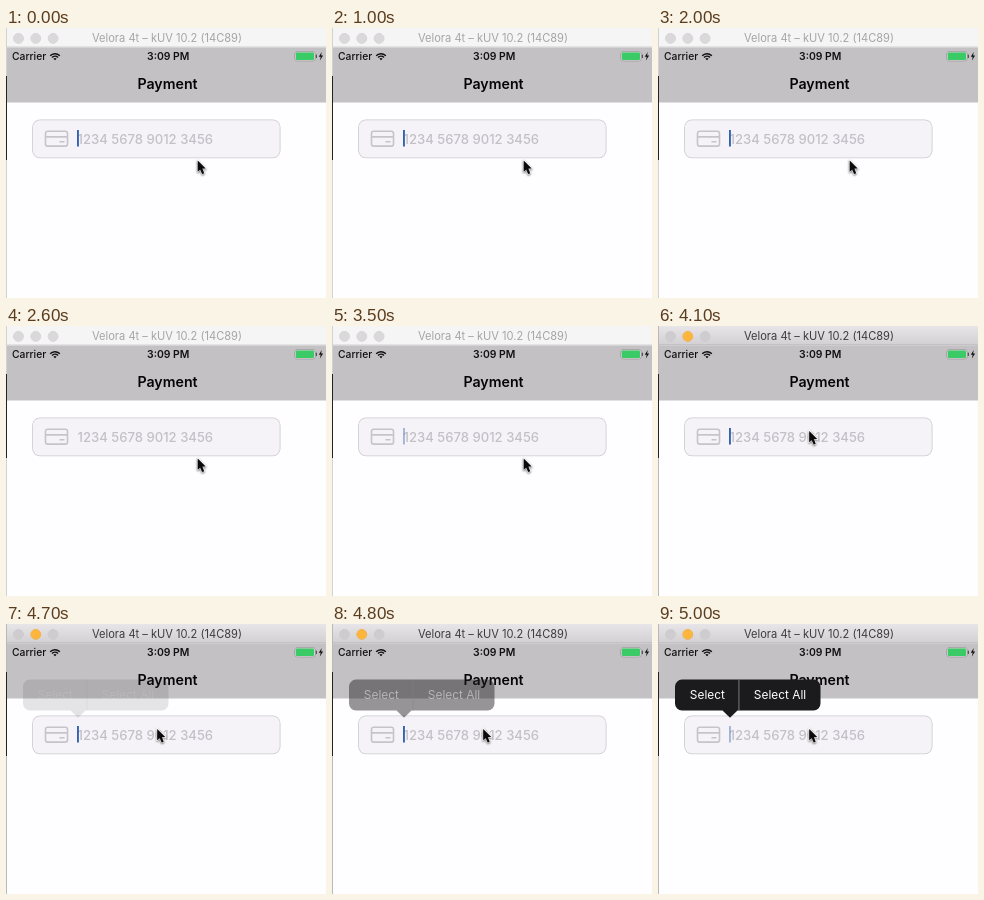
Write an HTML page with a canvas that moves like this. It is 320 px wide and 270 px high and loops after 5100 ms.

```html
<!DOCTYPE html>
<html lang="en">
<head>
<meta charset="utf-8">
<title>Payment field</title>
<style>
html, body { margin: 0; width: 100%; height: 100%; overflow: hidden; background: #fff; }
canvas { display: block; width: 320px; height: 270px; }
</style>
</head>
<body>
<canvas id="stage"></canvas>
<script>
const W = 320, H = 270, LOOP = 5100, STEP = 100;
const CLICK = 4000; // the window gains focus
const FONT = 'Inter, "Liberation Sans", sans-serif';
const INK = '#111', LINE = '#c6c3c9';
const canvas = document.getElementById('stage');
const ratio = window.devicePixelRatio || 1;
canvas.width = W * ratio;
canvas.height = H * ratio;
const ctx = canvas.getContext('2d');

function ease(t, from, to) {
  const p = Math.min(1, Math.max(0, (t - from) / (to - from)));
  return p * p * (3 - 2 * p);
}

// One blink per second; the click holds the caret lit for a while.
function caretAlpha(t) {
  const phase = t < CLICK ? t % 1000 : Math.max(0, t - CLICK - 500);
  return 1 - ease(phase, 380, 600) + ease(phase, 850, 1000);
}

function rect(x, y, w, h, fill) {
  ctx.fillStyle = fill;
  ctx.fillRect(x, y, w, h);
}

function paint(fill, stroke, line = 1) {
  if (stroke) {
    ctx.strokeStyle = stroke;
    ctx.lineWidth = line;
    ctx.stroke();
  }
  if (fill) {
    ctx.fillStyle = fill;
    ctx.fill();
  }
}

function round(x, y, w, h, r, fill, stroke, line) {
  ctx.beginPath();
  ctx.roundRect(x, y, w, h, r);
  paint(fill, stroke, line);
}

function poly(points, fill, stroke, line) {
  ctx.beginPath();
  points.forEach(([x, y]) => ctx.lineTo(x, y));
  ctx.closePath();
  paint(fill, stroke, line);
}

function text(str, x, y, size, color, align = 'left', weight = 400) {
  ctx.font = `${weight} ${size}px ${FONT}`;
  ctx.textAlign = align;
  ctx.fillStyle = color;
  ctx.fillText(str, x, y);
}

function titleBar(active, hover) {
  const shade = ctx.createLinearGradient(0, 0, 0, 19);
  shade.addColorStop(0, active ? '#e8e5e9' : '#f6f5f6');
  shade.addColorStop(1, active ? '#d3d0d4' : '#f6f5f6');
  rect(1, 0, W, 19, shade);
  rect(1, 18.5, W, 1, active ? '#b5b3b5' : '#d2d1d2');
  for (let i = 0; i < 3; i++) {
    const lit = hover && i === 1;
    ctx.beginPath();
    ctx.arc(12.5 + i * 17.3, 10.4, 4.9, 0, Math.PI * 2);
    paint(lit ? '#fdb53b' : active ? '#cfccd0' : '#dad8da', lit ? '#e5a33a' : '#c9c7ca', .8);
  }
  text('Velora 4t – kUV 10.2 (14C89)', 161, 14.3, 11.1, active ? '#3c3c3c' : '#a6a5a6', 'center');
}

function wifi(x, y) {
  const from = -Math.PI * .76, to = -Math.PI * .24;
  for (const r of [4.1, 6.6]) {
    ctx.beginPath();
    ctx.arc(x, y, r, from, to);
    paint(null, INK, 1.5);
  }
  ctx.beginPath();
  ctx.moveTo(x, y);
  ctx.arc(x, y, 2.2, from, to);
  paint(INK);
}

function battery(x, y) {
  round(x, y, 20, 9, 2, '#d0ced0', '#777', .7);
  round(x + .8, y + .8, 18.2, 7.4, 1.2, '#3acb66');
  round(x + 20.8, y + 2.8, 1.2, 3.4, .6, '#555');
  poly([[315.7, 24], [312.8, 28.8], [314.7, 28.8], [313.9, 32.6], [317.1, 27.4], [315.1, 27.4]], INK);
}

function header() {
  rect(1, 19.5, W, 55, '#c3c1c3');
  text('Carrier', 6, 32.1, 10.3, INK, 'left', 500);
  wifi(49, 32.3);
  text('3:09 PM', 162.2, 32.2, 10.4, INK, 'center', 600);
  battery(289, 23.8);
  text('Payment', 161.5, 61, 14.2, '#050505', 'center', 600);
}

function field(caret) {
  round(27, 92.3, 246.7, 37.2, 7, '#f5f3f7', '#ccc9cf', 1.6);
  round(39.5, 103.3, 22, 14.8, 2.2, null, LINE, 1.6);
  rect(40, 108, 21, 1.7, LINE);
  rect(53.5, 113, 5, 1.5, LINE);
  text('1234 5678 9012 3456', 71.5, 115.5, 13.1, '#c3c0c7', 'left', 500);
  ctx.globalAlpha = caret;
  rect(71, 102, 1.9, 16.5, '#3363b0');
  ctx.globalAlpha = 1;
}

function menu(alpha) {
  const left = 17, top = 55.6, width = 145.5, height = 30.9, tip = 72;
  const base = top + height;
  ctx.globalAlpha = alpha;
  ctx.beginPath();
  ctx.roundRect(left, top, width, height, 7);
  ctx.moveTo(tip - 7.5, base);
  ctx.lineTo(tip, base + 7.3);
  ctx.lineTo(tip + 7.5, base);
  paint('#1b1a1d');
  rect(80.5, top, .9, height, '#858388');
  text('Select', 49.4, 75.3, 11.9, '#fff', 'center');
  text('Select All', 122, 75.3, 11.9, '#fff', 'center');
  ctx.globalAlpha = 1;
}

function pointer(x, y) {
  ctx.save();
  ctx.translate(x, y);
  ctx.lineJoin = 'round';
  ctx.shadowColor = 'rgba(0, 0, 0, .4)';
  ctx.shadowBlur = 2 * ratio;
  ctx.shadowOffsetY = .8 * ratio;
  poly([[0, 0], [0, 11.3], [2.5, 9], [4.5, 13.6], [6.5, 12.8], [4.6, 8.2], [8, 8.2]],
    '#0a0a0a', '#fff', 1.8);
  ctx.restore();
}

function leftEdge(active) {
  rect(0, 0, 1, H, active ? '#b9b9b9' : '#d2d2d2');
  rect(0, 48, 1, 84, '#222');
}

function draw(t) {
  const active = t >= CLICK;
  const move = ease(t, 3500, 3900);
  ctx.setTransform(ratio, 0, 0, ratio, 0, 0);
  rect(0, 0, W, H, '#fefdff');
  titleBar(active, t > CLICK);
  header();
  field(caretAlpha(t));
  menu(ease(t, 4620, 5000));
  pointer(191.7 - 40.5 * move, 132.4 - 27.5 * move);
  leftEdge(active);
}

const begin = performance.now();
function tick() {
  const t = (performance.now() - begin) % LOOP;
  draw(Math.floor(t / STEP) * STEP);
  requestAnimationFrame(tick);
}
tick();
</script>
</body>
</html>
```
